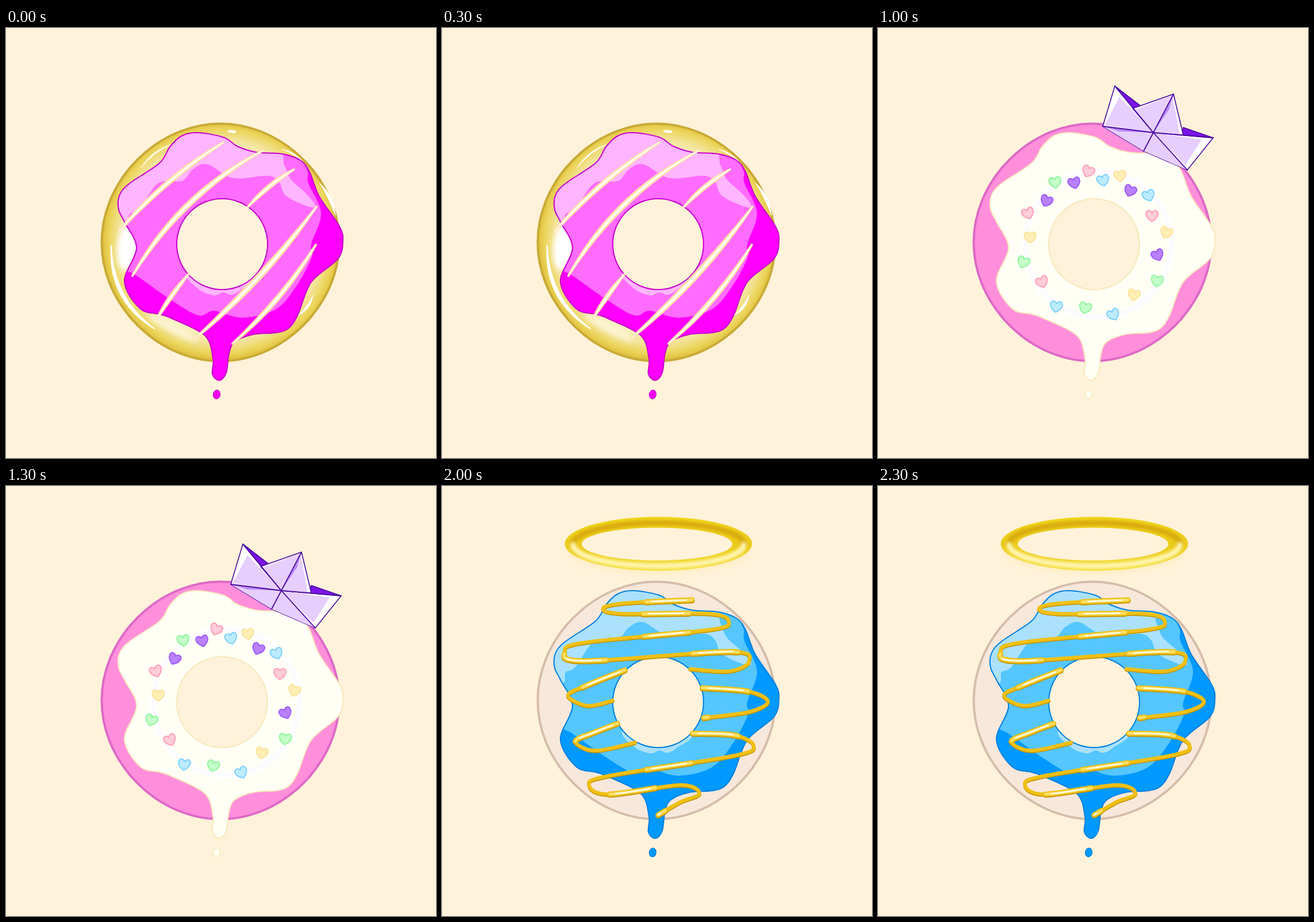
Animation, 748 px wide and 748 px high, one loop 2500 ms. Source, as an HTML page:

```html
<!DOCTYPE html>
<html lang="en">
<head>
<meta charset="utf-8">
<title>Doughnuts</title>
<style>
  html, body { margin: 0; width: 100%; height: 100%; overflow: hidden; background: #fff2da; }
  svg { display: block; width: 100vw; height: 100vh; }
  .scene { visibility: hidden; animation: show 2.5s step-end infinite; animation-delay: calc(var(--i) * .5s - 2.5s); }
  @keyframes show {
    0% { visibility: visible; }
    20%, 100% { visibility: hidden; }
  }
</style>
</head>
<body>
<svg id="stage" viewBox="0 0 748 748" stroke-linecap="round" stroke-linejoin="round"></svg>
<script>
const BG = '#fff2da', MID = 376;
const rnd = n => Math.round(n * 10) / 10;
const range = n => [...Array(n).keys()];
const polar = (deg, d, x = MID, y = MID) =>
  [rnd(x + d * Math.cos(deg * Math.PI / 180)), rnd(y + d * Math.sin(deg * Math.PI / 180))];
const points = text => text.trim().split(/\s+/).map(s => s.split(',').map(Number));

// Catmull-Rom spline
function smooth(p, closed = true) {
  const n = p.length;
  const at = i => closed ? p[(i + n) % n] : p[Math.max(0, Math.min(n - 1, i))];
  let d = 'M' + p[0];
  for (let i = 0; i < (closed ? n : n - 1); i++) {
    const [a, b, c, e] = [at(i - 1), at(i), at(i + 1), at(i + 2)];
    const c1 = [0, 1].map(k => rnd(b[k] + (c[k] - a[k]) / 6));
    const c2 = [0, 1].map(k => rnd(c[k] - (e[k] - b[k]) / 6));
    d += `C${c1} ${c2} ${c}`;
  }
  return d + (closed ? 'Z' : '');
}

const path = (d, fill, stroke = 'none', w = 0, more = '') =>
  `<path d="${d}" fill="${fill}" stroke="${stroke}" stroke-width="${w}" ${more}/>`;
const line = (d, color, w, more) => path(d, 'none', color, w, more);
const oval = (x, y, rx, ry, fill, turn = 0, more = '') =>
  `<ellipse cx="${x}" cy="${y}" rx="${rx}" ry="${ry}" fill="${fill}" transform="rotate(${turn} ${x} ${y})" ${more}/>`;
const dot = (x, y, r, fill, more) => oval(x, y, r, r, fill, 0, more);
const clip = (id, body) => `<g clip-path="url(#${id})">${body}</g>`;

// Tapered stroke from a to b, bowed sideways
function leaf([x0, y0], [x1, y1], bow, w, fill, sw = 1, stroke = fill) {
  const len = Math.hypot(x1 - x0, y1 - y0);
  const nx = (y0 - y1) / len, ny = (x1 - x0) / len;
  const ctrl = k => `${rnd((x0 + x1) / 2 + nx * k)} ${rnd((y0 + y1) / 2 + ny * k)}`;
  return path(`M${x0} ${y0}Q${ctrl(2 * bow + w)} ${x1} ${y1}Q${ctrl(2 * bow - w)} ${x0} ${y0}Z`, fill, stroke, sw);
}

const doughD = smooth(range(36).map(i => polar(i * 10, 205.2 + 1.3 * Math.cos(i * 40 * Math.PI / 180), 373, 373)));
const icingD = smooth(points(`332,182 378,190 403,206 435,216 480,219 512,230 528,250 545,293 580,345
  586,371 577,402 531,442 508,498 492,522 470,530 430,533 398,546 388,566 383,600 371,613 359,602
  360,575 346,535 290,506 268,498 233,488 206,441 227,383 207,339 196,316 197,292 214,271 267,235 285,207 305,188`));

const dough = (fill, stroke, w = 4) => path(doughD, fill, stroke, w);
const hole = (stroke, w = 2) => dot(MID, MID, 79, BG, `stroke="${stroke}" stroke-width="${w}"`);
const drop = (fill, stroke) => oval(366.5, 637.5, 5.8, 7.5, fill, 8, `stroke="${stroke}" stroke-width="1.5"`);

// Three-tone glossy icing
const midD = smooth(points(`480,190 522,243 526,270 548,322 531,376 532,398 507,446 470,489 412,504
  362,492 335,500 290,475 226,430 180,400 180,280 260,170`));
const lightD = smooth(points(`190,345 212,342 215,324 232,315 265,270 306,266 325,246 350,237 395,261
  455,257 475,268 487,292 527,311 538,308 520,286 495,263 485,240 460,200 300,160 180,250`));
const shineD = smooth(points('314,424 335,454 362,465 378,460 392,464 408,456 436,430 376,400'));
const glaze = (dark, mid, light, edge) =>
  path(icingD, dark) +
  clip('icing', path(midD, mid) + path(lightD, light) + path(shineD, light)) +
  line(icingD, edge, 2) + drop(dark, edge) + hole(edge);

function strawberry() {
  const stripe = (a, b, bow, w) => leaf(a, b, bow, w, '#ffedc6', 4, '#ffdfaa') + leaf(a, b, bow, w * .45, '#fffdf4', 1.5);
  return dough('url(#gold)', '#c9aa35') +
    clip('dough', oval(212, 378, 18, 44, '#fff', 8, 'filter="url(#blur)"') +
      oval(290, 522, 50, 8, '#fffbe8', 28, 'filter="url(#blur)" opacity=".7"')) +
    leaf([183, 378], [258, 523], 22, 5, '#fff', 2) + leaf([534, 465], [508, 500], -4, 4, '#fff') +
    leaf([235, 243], [286, 203], -5, 2, '#fff') + leaf([481, 211], [518, 234], -3, 2, '#fff') +
    leaf([546, 270], [573, 326], -4, 5, '#fff') + oval(393, 180, 8, 2.5, '#fff', 5) +
    glaze('#ff00ff', '#ff6cff', '#ffb5ff', '#c800cc') +
    stripe([196, 354], [378, 199], -9, 6) + stripe([220, 431], [447, 213], -22, 7) +
    stripe([421, 311], [501, 246], -4, 5) + stripe([263, 505], [317, 429], -2, 5) +
    stripe([329, 540], [540, 311], 9, 8) + stripe([394, 549], [539, 377], 9, 6);
}

// Sprinkles scattered evenly around the hole
function scatter(count, seed, draw) {
  const next = () => (seed = seed * 16807 % 2147483647) / 2147483647;
  next();
  return range(count).map(i => draw(...polar((i + next()) / count * 360, 87 + 22 * (next() + next())))).join('');
}
const beads = (count, r, fill, rim, seed) => scatter(count, seed, (x, y) =>
  dot(x, y, r, fill, `stroke="${rim}" stroke-width="1.2"`) + dot(x - r * .2, y - r * .2, r * .4, '#fff', 'opacity=".28"'));

function balloon() {
  return path(smooth(points('494,13 546,43 553,76 524,133 491,146 460,132 435,73 444,42')), '#00a1ff', '#0088fa', 2) +
    path('M546 42C560 85 540 130 491 146C528 122 549 85 546 42Z', '#0074ff') +
    path(smooth(points('487,20 502,30 497,50 468,92 450,108 440,84 443,52 462,28')), 'url(#sheen)', 'none', 0, 'filter="url(#soft)"') +
    path('M485 144L482 150Q478 153 484 153L496 153Q501 152 496 149L494 144Z', '#0091f5', '#0078de', 1.5) +
    line('M488 153C470 174 462 200 462 230C467 256 467 280 460 302C453 327 434 331 431 321', '#000', 2.2) +
    line('M470 182C461 183 462 190 470 184C476 178 478 186 469 184M469 184L464 191M470 184L476 190', '#000', 1.5);
}

function blueberry() {
  const star = (x, y) => dot(x, y, 10, '#8af4ff', 'filter="url(#soft)" opacity=".65"') +
    `<path d="M0-11Q0 0 11 0Q0 0 0 11Q0 0-11 0Q0 0 0-11Z" fill="#d6fcff" transform="translate(${x} ${y})"/>`;
  const pale = (x, y, rx, ry, turn = 0, c = '#62dcff') => oval(x, y, rx, ry, c, turn, 'opacity=".85"');
  return dough('#cb8666', '#a5654a') + path(icingD, '#00d4fc') +
    clip('icing', line(icingD, '#fff', 32)) +
    path('M345 510Q364 530 363 560L363 598Q369 611 377 600L383 560Q388 535 405 512Z', '#00d4fc') +
    dot(MID, MID, 96, '#00b5ff') +
    range(7).map(i => dot(...polar(i * 360 / 7, 105), 33, '#00b5ff')).join('') +
    pale(375, 238, 17, 12, 5) + pale(355, 225, 6, 5) + pale(251, 295, 7, 13, 25) + pale(317, 490, 9, 9) +
    pale(488, 270, 19, 14, 40, '#a2efff') + pale(483, 434, 13, 18, 15, '#86e5ff') + pale(416, 492, 17, 7, -15) +
    star(538, 381) + star(272, 445) + star(478, 371) +
    line('M222 306C235 276 270 288 287 262C298 242 296 216 319 209', '#fff', 4) +
    line('M491 477C494 503 484 513 458 512', '#fff', 3.5) + line('M377 565Q377 586 372 598', '#d5faff', 2) +
    scatter(54, 77, (x, y) => dot(x, y, 2.7, '#0a8cff')) + scatter(52, 4211, (x, y) => dot(x, y, 2.6, '#fff')) +
    beads(24, 4.5, '#ff7a12', '#d9620a', 901) + beads(15, 4.2, '#ff1726', '#c50d1c', 3517) +
    beads(19, 3.6, '#1fd01f', '#129c17', 6203) + beads(12, 3.5, '#fff200', '#dfcd00', 1409) +
    beads(10, 7, '#d53bff', '#9a20c9', 2801) +
    hole('none', 0) + drop('#fff', 'none') + balloon();
}

function paperCrown() {
  const ink = '#4b0aa0';
  const poly = (pts, fill, edge = 'none') => `<polygon points="${pts}" fill="${fill}" stroke="${edge}" stroke-width="1.6"/>`;
  return poly('412,101 456,135 479,182', '#7c14e6', ink) + poly('531,173 583,191 528,187', '#7c14e6', ink) +
    poly('412,101 391,171 462,214 538,247 583,191 479,182', '#fff', ink) +
    poly('420,120 394,169 479,182', '#e6cfff') + poly('391,171 479,182 462,214', '#e6cfff') +
    poly('391,171 479,182 420,180', '#bd8cf5') + poly('479,182 462,214 538,247', '#e6cfff') +
    poly('479,182 563,194 535,238', '#e6cfff') +
    poly('443,140 514,115 531,186 479,182', '#fff', ink) + poly('447,142 512,117 525,185 479,182', '#e6cfff') +
    poly('514,115 506,142 479,182', '#b98af2') +
    line('M412 101L479 182L538 247M391 171L479 182L583 191M514 115L479 182L462 214', ink, 1.8);
}

function vanilla() {
  const tint = {
    r: ['#ffccd9', '#ff9db5'], p: ['#b980ff', '#9c5cf2'], y: ['#ffefb5', '#fbe29a'],
    b: ['#bdebff', '#7dd0fb'], g: ['#c5ffc9', '#8cf598']
  };
  // Two alternating rings, spaced wider along the bottom
  const hearts = [...'rbypbrypgybgbrgyrpgp'].map((c, i) => {
    const spot = polar(18 * i - 100 + 17 * Math.cos((i - 16) * Math.PI / 10), i % 2 ? 112 : 127);
    return path('M0 10C-15 1 -11 -10 -5 -9Q-1 -8 0 -5Q1 -8 5 -9C11 -10 15 1 0 10Z',
      ...tint[c], 2, `transform="translate(${spot}) rotate(${rnd(24 * Math.cos(i * 2.2))})"`);
  });
  return dough('#ff8fdb', '#de69c6') + path(icingD, '#fffff6', '#f6e8b9', 2) +
    dot(383, MID, 127, 'none', 'stroke="#fcfbff" stroke-width="9"') +
    hole('#f6e8b9') + drop('#fffff6', '#f6e8b9') + hearts.join('') + paperCrown();
}

function bear(fill, rim, [x, y], turn) {
  const pair = (dx, dy, r, c) => dot(-dx, dy, r, c) + dot(dx, dy, r, c);
  const body = (c, grow) => pair(6, -14, 3.2 + grow, c) + pair(8, -1, 3.8 + grow, c) + pair(6.5, 11, 5 + grow, c) +
    oval(0, 4, 8.5 + grow, 9.5 + grow, c) + oval(0, -9, 7.5 + grow, 6.8 + grow, c);
  return `<g transform="translate(${x} ${y}) rotate(${turn})">${body(rim, .8)}${body(fill, -.9)}` +
    `<g opacity=".35">${dot(0, -6, 2.6, '#fff')}${dot(-2, 4, 3.2, '#fff')}${pair(6, 11, 2, rim)}</g></g>`;
}

function rainbow() {
  const red = ['#ff7d9b', '#ff5f87'], violet = ['#b57aff', '#8a45f5'], lemon = ['#fff29a', '#ffe23a'];
  const sky = ['#85e3ff', '#2fbaf8'], orange = ['#ffbd69', '#ff9a26'], lime = ['#8cff55', '#57d022'];
  const turns = [0, -12, 55, -62, 0, 215, -6, -78, 25];
  const bears = [violet, sky, lemon, red, orange, violet, lemon, lime, red]
    .map((c, i) => bear(...c, polar(i * 40 - 97, 115, 371, 371), turns[i]));
  return dough('url(#bands)', 'url(#rims)') + path(icingD, 'url(#pearl)') +
    clip('icing', oval(420, 270, 60, 26, '#f3c3e4', 20, 'filter="url(#haze)" opacity=".7"') +
      oval(350, 500, 60, 22, '#f1c9ea', 10, 'filter="url(#haze)" opacity=".8"') +
      line(icingD, '#fff', 15, 'filter="url(#blur)"') +
      dot(MID, MID, 82, 'none', 'stroke="#fff" stroke-width="14" filter="url(#blur)"')) +
    line(icingD, '#a1a9e6', 2) + hole('#929fd4') + drop('#f6f2ff', '#a1a9e6') +
    leaf([255, 312], [321, 245], -13, 9, '#fff', 2) + oval(339, 236, 8, 5, '#fff', -15) +
    leaf([464, 408], [421, 460], 10, 3, '#fff') + bears.join('');
}

function halo() {
  const ring = 'M213.5 100.5a163 47 0 1 0 326 0a163 47 0 1 0 -326 0ZM243 101a131 28.5 0 1 1 262 0a131 28.5 0 1 1 -262 0Z';
  const arc = (y, sweep, color, w) => line(`M228 ${y}A148 37 0 0 ${sweep} 525 ${y}`, color, w, 'filter="url(#soft)"');
  return oval(376, 112, 158, 40, '#ffe9a8', 0, 'filter="url(#blur)" opacity=".5"') +
    oval(374, 101, 132, 29, BG) + path(ring, 'url(#halo)', 'none', 0, 'fill-rule="evenodd"') +
    `<g clip-path="url(#ring)">${arc(101, 1, '#d9ab08', 10)}${arc(102, 0, '#fff6b4', 9)}</g>`;
}

// Zigzag of rounded turns [x, y, half height]; the side flips at each one
function zigzag(start, side, turns, end) {
  const bends = turns.flatMap(([x, y, h], i) => {
    const back = x - side * 34 * (-1) ** i;
    return [[back, y - h], [x, y], [back, y + h]];
  });
  return smooth([start, ...bends, end], false);
}

function honey() {
  const strands = [
    zigzag([435, 198], -1, [[280, 213, 9], [499, 236, 14], [214, 288, 16], [534, 305, 17]], [432, 318]),
    zigzag([318, 320], -1, [[219, 364, 18]], [297, 373]),
    zigzag([453, 351], 1, [[567, 375, 18]], [455, 403]),
    zigzag([305, 413], -1, [[232, 444, 16]], [336, 446]),
    zigzag([436, 430], 1, [[542, 451, 18], [256, 520, 16], [448, 535, 15]], [376, 572])
  ];
  const coat = (color, w, more) => strands.map(d => line(d, color, w, more)).join('');
  const dashes = 'stroke-dasharray="80 150"';
  return dough('#f8e8db', '#d5bcab') + glaze('#0099ff', '#55c6ff', '#abe1fd', '#007fdf') +
    `<g transform="translate(0 1.5)">${coat('#c4960a', 6.5)}${coat('#c4960a', 9.5, dashes)}</g>` +
    coat('#f0c013', 6) + coat('#f0c013', 9, dashes) +
    coat('#f9df66', 5, dashes) + coat('#fffbe2', 2.5, 'stroke-dasharray="60 170" stroke-dashoffset="-10"') + halo();
}

const stops = list => list.map(([o, c]) => `<stop offset="${o}" stop-color="${c}"/>`).join('');
const radial = (id, x, y, r, list) =>
  `<radialGradient id="${id}" gradientUnits="userSpaceOnUse" cx="${x}" cy="${y}" r="${r}">${stops(list)}</radialGradient>`;
const linear = (id, dir, list) => `<linearGradient id="${id}" ${dir}>${stops(list)}</linearGradient>`;
const blur = (id, s) => `<filter id="${id}" x="-50%" y="-50%" width="200%" height="200%"><feGaussianBlur stdDeviation="${s}"/></filter>`;

// Hard-edged rings spreading from the upper left
const rings = colors => {
  const r = [0, 164, 229, 313, 348, 399, 500];
  return colors.flatMap((c, i) => [[r[i] / 500, c], [r[i + 1] / 500, c]]);
};

const defs = `<defs>
  <clipPath id="dough"><path d="${doughD}"/></clipPath>
  <clipPath id="icing"><path d="${icingD}"/></clipPath>
  <clipPath id="ring"><path clip-rule="evenodd" d="M213.5 100.5a163 47 0 1 0 326 0a163 47 0 1 0 -326 0ZM243 101a131 28.5 0 1 1 262 0a131 28.5 0 1 1 -262 0Z"/></clipPath>
  ${blur('soft', 2.5)}${blur('blur', 5)}${blur('haze', 14)}
  ${radial('gold', 374, 371, 210, [[.72, '#fff6d2'], [.85, '#f3e398'], [.93, '#ecd55c'], [.97, '#e2c544'], [1, '#cfae38']])}
  ${radial('bands', 230, 200, 500, rings(['#f052ff', '#9a50ff', '#6050ff', '#5078ff', '#50b8ff', '#50ffc2']))}
  ${radial('rims', 230, 200, 500, rings(['#df00ef', '#6510ee', '#4a14f0', '#3058fa', '#00a0d2', '#00da90']))}
  ${linear('pearl', 'x1="0" y1=".1" x2=".9" y2=".8"', [[0, '#c3dcff'], [.25, '#d0cffc'], [.5, '#e4c8f5'], [1, '#eedcf8']])}
  ${linear('sheen', 'x1="0" y1="0" x2="1" y2=".5"', [[0, '#58ccff'], [.5, '#7addff'], [1, '#22aeff']])}
  ${linear('halo', 'x1="0" y1="0" x2="0" y2="1"', [[0, '#f2da20'], [.5, '#ecca1c'], [1, '#f5df3a']])}
</defs>`;

document.getElementById('stage').innerHTML = defs +
  [strawberry, blueberry, vanilla, rainbow, honey]
    .map((draw, i) => `<g class="scene" style="--i:${i}">${draw()}</g>`).join('');
</script>
</body>
</html>
```
